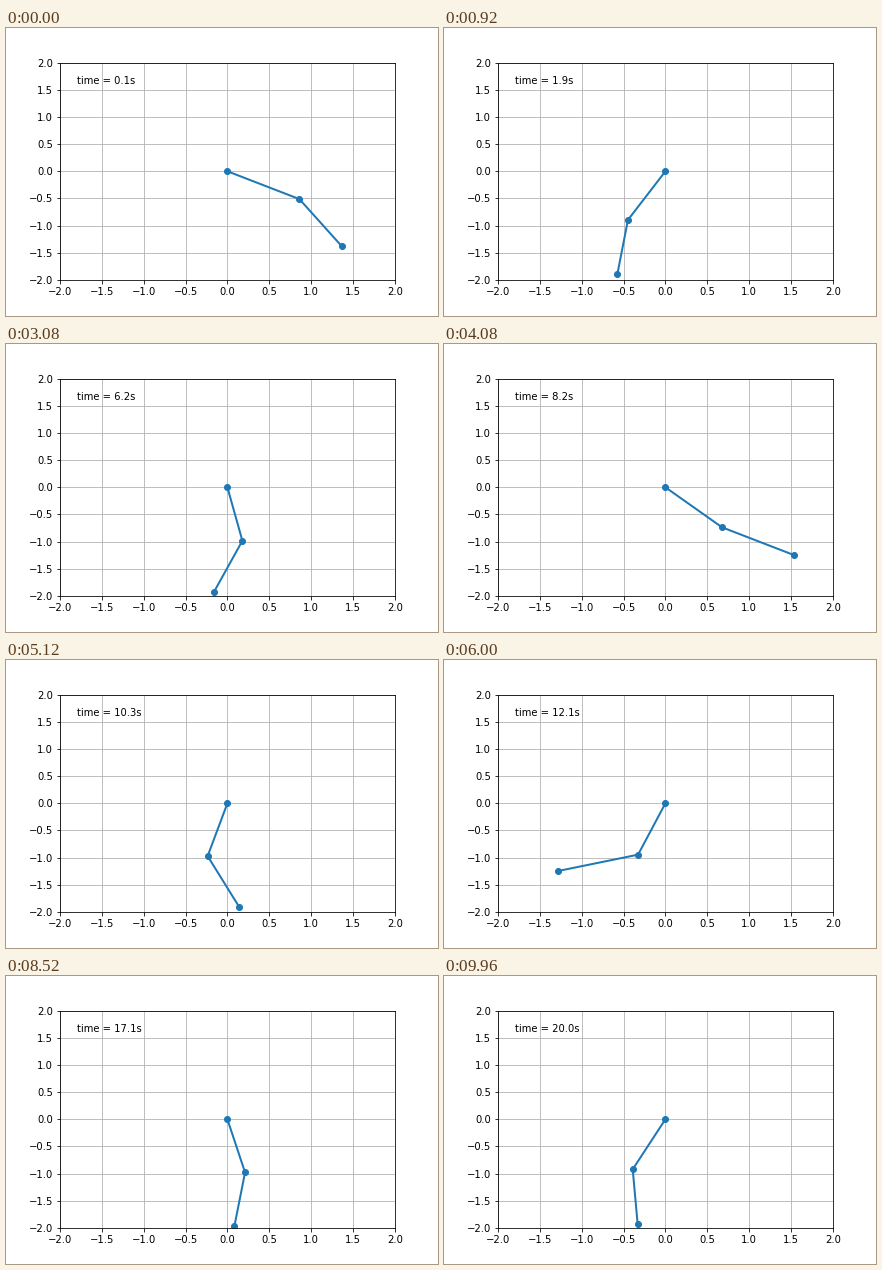
A matplotlib script that plays this animation: 432 by 288 pixels, repeating every 10000 ms.

```python
from math import cos, radians, sin

import matplotlib.pyplot as plt
import numpy as np
from matplotlib.animation import FuncAnimation

G = 9.8          # gravity; both rods and both masses are 1
DT = 0.05        # simulated seconds per stored state
STATES = 400
SUBSTEPS = 20
FRAMES = 250


def derivs(state):
    a1, w1, a2, w2 = state
    s, c = sin(a2 - a1), cos(a2 - a1)
    den = 2 - c * c
    acc1 = (w1 * w1 * s * c + G * sin(a2) * c + w2 * w2 * s
            - 2 * G * sin(a1)) / den
    acc2 = (-w2 * w2 * s * c + 2 * G * sin(a1) * c - 2 * w1 * w1 * s
            - 2 * G * sin(a2)) / den
    return np.array([w1, acc1, w2, acc2])


def rk4(state, h):
    k1 = derivs(state)
    k2 = derivs(state + h / 2 * k1)
    k3 = derivs(state + h / 2 * k2)
    k4 = derivs(state + h * k3)
    return state + h / 6 * (k1 + 2 * k2 + 2 * k3 + k4)


def simulate():
    state = np.array([radians(60), 0.0, radians(30), 0.0])
    path = [state]
    for _ in range(STATES - 1):
        for _ in range(SUBSTEPS):
            state = rk4(state, DT / SUBSTEPS)
        path.append(state)
    return np.array(path)


path = simulate()
x1, y1 = np.sin(path[:, 0]), -np.cos(path[:, 0])
x2, y2 = x1 + np.sin(path[:, 2]), y1 - np.cos(path[:, 2])

plt.rcParams.update({"font.family": "DejaVu Sans", "font.size": 10})
fig = plt.figure(figsize=(6, 4), dpi=72, facecolor="white")
fig.subplots_adjust(left=0.125, right=0.9, bottom=0.125, top=0.88)
ax = fig.add_subplot(xlim=(-2, 2), ylim=(-2, 2))
ticks = np.arange(-2, 2.1, 0.5)
ax.set_xticks(ticks)
ax.set_yticks(ticks)
ax.grid()

rods, = ax.plot([], [], "o-", color="#1f77b4", lw=2, markersize=6)
clock = ax.text(0.05, 0.9, "", transform=ax.transAxes)


def update(frame):
    # The simulation runs at 40 states per second, shown at 25 fps.
    i = min(8 * (frame + 1) // 5, STATES - 1)
    rods.set_data([0, x1[i], x2[i]], [0, y1[i], y2[i]])
    clock.set_text(f"time = {i * DT:.1f}s")
    return rods, clock


anim = FuncAnimation(fig, update, frames=FRAMES, interval=40,
                     repeat=True, repeat_delay=0, blit=False)
plt.show()
```
